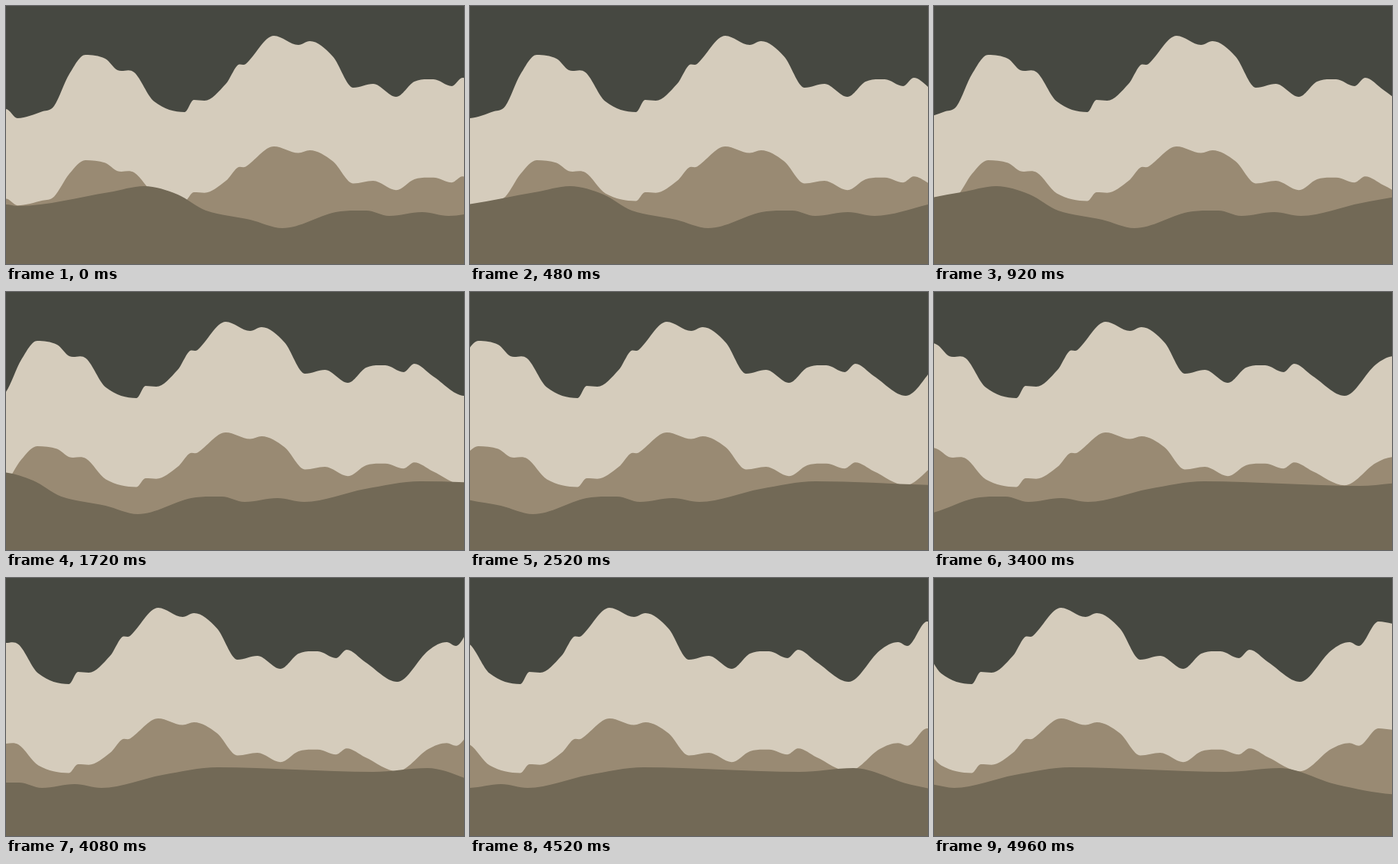
An HTML page with a canvas for the animation above (5000 ms loop, 600 px wide and 338 px high).

```html
<!DOCTYPE html>
<html lang="en">
<head>
<meta charset="utf-8">
<title>Drifting mountains</title>
<style>
  html, body { margin: 0; width: 100%; height: 100%; overflow: hidden; background: #464841; }
  canvas { display: block; }
</style>
</head>
<body>
<canvas width="600" height="338"></canvas>
<script>
const WIDTH = 600, HEIGHT = 338, LOOP = 5000, STEP = 40;
const ctx = document.querySelector('canvas').getContext('2d');

// Key peaks, shoulders and valleys of each ridge
const mountains = ridge([
  [0, 135], [15, 147], [48, 138], [63, 131], [83, 89], [104, 64], [130, 69], [146, 84],
  [168, 87], [194, 125], [234, 139], [246, 123], [260, 124], [288, 102], [303, 78], [314, 76],
  [351, 39], [383, 51], [398, 46], [428, 66], [455, 107], [481, 102], [511, 119], [535, 99],
  [560, 96], [584, 105], [598, 94], [622, 110], [664, 136], [705, 95], [729, 84], [741, 89],
  [767, 57], [800, 62]]);

const hills = ridge([
  [0, 260], [15, 262], [135, 244], [181, 236], [225, 247], [262, 268], [320, 280], [362, 291],
  [432, 270], [472, 268], [502, 275], [545, 270], [580, 275], [660, 258], [732, 248],
  [936, 254], [1007, 249], [1083, 271], [1170, 284]]);

// Smooth outline through the points, level at every peak and valley
function ridge(points) {
  const slopes = points.map(([, y], i) => {
    const [x0, y0] = points[i - 1] || points[i];
    const [x1, y1] = points[i + 1] || points[i];
    return (y - y0) * (y1 - y) > 0 ? (y1 - y0) / (x1 - x0) : 0;
  });

  const path = new Path2D();
  path.moveTo(0, HEIGHT);
  path.lineTo(...points[0]);
  for (let i = 1; i < points.length; i++) {
    const [x0, y0] = points[i - 1], [x1, y1] = points[i], third = (x1 - x0) / 3;
    path.bezierCurveTo(x0 + third, y0 + slopes[i - 1] * third,
                       x1 - third, y1 - slopes[i] * third, x1, y1);
  }
  path.lineTo(points[points.length - 1][0], HEIGHT);
  path.closePath();
  return path;
}

function layer(path, color, shift, scaleY = 1, top = 0) {
  ctx.setTransform(1, 0, 0, scaleY, -shift, top);
  ctx.fillStyle = color;
  ctx.fill(path);
}

function draw(now) {
  const step = Math.floor((now % LOOP) / STEP);
  const travel = Math.max(0, step - 0.9); // the first step is a short one
  ctx.setTransform(1, 0, 0, 1, 0, 0);
  ctx.fillStyle = '#464841';
  ctx.fillRect(0, 0, WIDTH, HEIGHT);
  layer(mountains, '#d5ccbc', travel * 1.5);
  layer(mountains, '#998a73', travel * 1.5, 0.714, 156.2);
  layer(hills, '#726956', travel * 4.5);
}

function tick() {
  draw(performance.now());
  requestAnimationFrame(tick);
}
tick();
</script>
</body>
</html>
```
